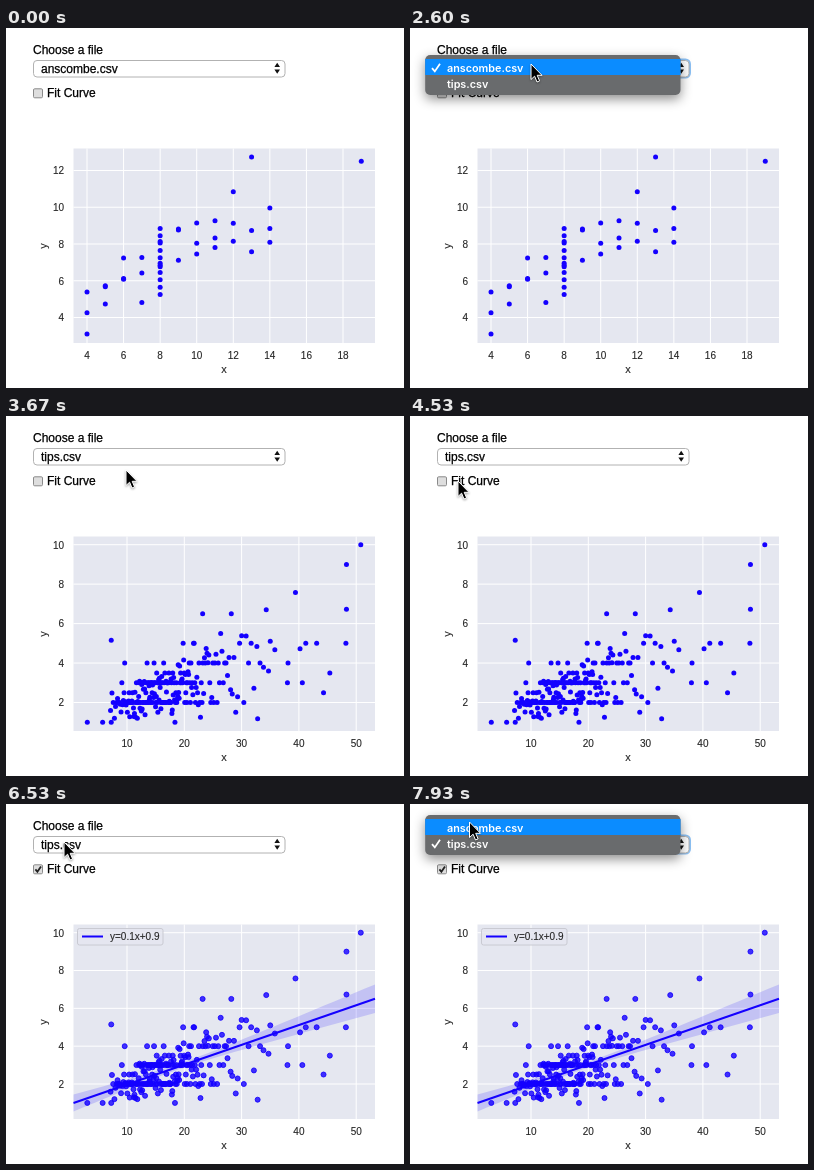
Recreate the animation shown at these times as an HTML page. Size 398x360 px, loop 8 s.

```html
<!DOCTYPE html>
<html lang="en">
<head>
<meta charset="utf-8">
<title>File chooser with scatter plot</title>
<style>
  html, body { margin: 0; width: 100%; height: 100%; overflow: hidden; background: #fff; }
  svg { display: block; }
  text { font-family: "Liberation Sans", Arial, sans-serif; font-size: 12px; stroke: #000; stroke-width: .25px; }
  .plot text { font-size: 10px; fill: #262626; stroke: #262626; stroke-width: .12px; }
  .plot .axis { font-size: 11px; }
  .menu text { font-family: Inter, Roboto, sans-serif; font-size: 10.8px; font-weight: 600; fill: #fff; stroke: none; }
  .menu .panel { filter: drop-shadow(0 4px 6px rgba(0, 0, 0, .45)); }
  .cursor { filter: drop-shadow(0 1px 1px rgba(0, 0, 0, .35)); }
</style>
</head>
<body>
<svg id="stage" width="398" height="360" viewBox="0 0 398 360"></svg>
<script>
const LOOP = 8000;
const STEP = 1000 / 15;
const BLUE = '#1400ff';
const stage = document.getElementById('stage');

function el(parent, tag, attrs = {}, text) {
  const node = document.createElementNS('http://www.w3.org/2000/svg', tag);
  for (const key in attrs) node.setAttribute(key, attrs[key]);
  if (text !== undefined) node.textContent = text;
  parent.appendChild(node);
  return node;
}

function show(node, visible) {
  node.style.display = visible ? '' : 'none';
}

function seeded(seed) {
  return () => (seed = (seed * 16807) % 2147483647) / 2147483647;
}

function range(from, to, step = 1) {
  const out = [];
  for (let v = from; v <= to; v += step) out.push(v);
  return out;
}

function linear(v0, p0, v1, p1) {
  return v => p0 + (v - v0) * (p1 - p0) / (v1 - v0);
}

// ---- data ----
// Four sets: a scattered line, a parabola, a line with an outlier, a column with an outlier.
function quartetPoints() {
  const scattered = [4.26, 5.68, 7.24, 4.82, 6.95, 8.81, 8.04, 8.33, 10.84, 7.58, 9.96];
  const sets = range(4, 14).flatMap((x, i) => [
    [x, scattered[i]],
    [x, -5.996 + 2.7808 * x - .12672 * x * x],
    [x, x === 13 ? 12.74 : 4 + .346 * x]
  ]);
  return [...sets, ...range(0, 9).map(i => [8, 5.25 + .4 * i]), [19, 12.5]];
}

// A noisy trend over log-logistic x values, often rounded to whole numbers, plus lone points.
function tipPoints() {
  const lone = [
    [3.07, 1], [5.75, 1], [7.25, 1], [7.25, 5.15], [9.6, 4], [23.2, 6.5], [28.2, 6.5],
    [34.3, 6.7], [32.8, 1.17], [34.7, 3.6], [35, 5.1], [35.8, 4.67], [38, 3], [38.1, 4],
    [39.4, 7.58], [40.2, 4.73], [40.6, 3], [41.2, 5], [43.1, 5], [44.3, 2.5], [45.4, 3.5],
    [48.2, 5], [48.3, 6.73], [48.3, 9], [50.8, 10]
  ];
  const rand = seeded(41);
  const cloud = range(0, 218).map(i => {
    const p = .03 + .91 * i / 218;
    const x = 17 * Math.pow(p / (1 - p), .25);
    const noise = rand() + rand() + rand() - 1.5;
    const y = Math.max(1.2, .92 + .105 * x + .085 * x * noise);
    const kind = rand();
    return [x, kind < .42 ? Math.max(2, Math.round(y)) : kind < .58 ? Math.round(y * 2) / 2 : y];
  });
  return [...lone, ...cloud];
}

// ---- plots ----
const AREA = { x: 67.5, y: 120.5, w: 301.5, h: 194.5 };

function makePlot({ points, px, py, xTicks, yTicks, dot, fit }) {
  const g = el(stage, 'g', { class: 'plot' });
  const right = AREA.x + AREA.w, bottom = AREA.y + AREA.h;
  el(g, 'rect', { x: AREA.x, y: AREA.y, width: AREA.w, height: AREA.h, fill: '#e5e7f0' });
  let grid = '';
  for (const v of xTicks) {
    grid += `M${px(v)} ${AREA.y}V${bottom}`;
    el(g, 'text', { x: px(v), y: 331.2, 'text-anchor': 'middle' }, v);
  }
  for (const v of yTicks) {
    grid += `M${AREA.x} ${py(v)}H${right}`;
    el(g, 'text', { x: 58, y: py(v) + 3.8, 'text-anchor': 'end' }, v);
  }
  el(g, 'path', { d: grid, stroke: '#fff', 'stroke-width': 1 });
  el(g, 'text', { class: 'axis', x: 218, y: 344.6, 'text-anchor': 'middle' }, 'x');
  el(g, 'text', { class: 'axis', transform: 'translate(41 218) rotate(-90)', 'text-anchor': 'middle' }, 'y');
  const dots = el(g, 'g', { fill: BLUE, ...dot });
  for (const [x, y] of points) el(dots, 'circle', { cx: px(x), cy: py(y), r: 2.5 });
  if (fit) drawFit(g, right);
  return g;
}

function drawFit(g, right) {
  const lineY = linear(AREA.x, 299, right, 194.7);
  const half = x => Math.hypot(2.8, (x - 177) * .073);
  const xs = range(0, 30).map(i => AREA.x + AREA.w * i / 30);
  const upper = xs.map(x => `${x},${lineY(x) - half(x)}`);
  const lower = xs.map(x => `${x},${lineY(x) + half(x)}`).reverse();
  el(g, 'polygon', { points: [...upper, ...lower].join(' '), fill: BLUE, 'fill-opacity': .16 });
  el(g, 'path', { d: `M${AREA.x} 299L${right} 194.7`, stroke: BLUE, 'stroke-width': 2 });
  el(g, 'rect', {
    x: 71.5, y: 124.5, width: 85.5, height: 16.5, rx: 2,
    fill: '#e5e7f0', 'fill-opacity': .8, stroke: '#c9cad2'
  });
  el(g, 'path', { d: 'M76 132.5H97', stroke: BLUE, 'stroke-width': 2 });
  el(g, 'text', { x: 104, y: 136 }, 'y=0.1x+0.9');
}

const tipAxes = {
  points: tipPoints(), px: linear(10, 121, 50, 350.2),
  xTicks: range(10, 50, 10), yTicks: range(2, 10, 2)
};
const quartetPlot = makePlot({
  points: quartetPoints(), px: linear(4, 81, 18, 337), py: linear(4, 289.5, 12, 142.5),
  xTicks: range(4, 18, 2), yTicks: range(4, 12, 2)
});
const tipPlot = makePlot({ ...tipAxes, py: linear(2, 286.5, 10, 128.7) });
const fitPlot = makePlot({
  ...tipAxes, py: linear(2, 280, 10, 128.7), fit: true,
  dot: { 'fill-opacity': .8, stroke: BLUE, 'stroke-opacity': .85 }
});

// ---- form ----
const FILES = ['anscombe.csv', 'tips.csv'];
el(stage, 'text', { x: 27, y: 26.3 }, 'Choose a file');
const ring = el(stage, 'rect', {
  x: 26.5, y: 31.5, width: 253.5, height: 18, rx: 4.5,
  fill: 'none', stroke: '#8cc0f3', 'stroke-width': 2
});
el(stage, 'rect', { x: 27.5, y: 32.5, width: 251.5, height: 16.5, rx: 3.5, fill: '#fff', stroke: '#b2b2b2' });
el(stage, 'path', { d: 'M268.4 39L271.2 34.8L274 39ZM268.4 41.6L271.2 45.8L274 41.6Z', fill: '#111' });
const chosen = el(stage, 'text', { x: 35, y: 44.6 });

const box = el(stage, 'rect', { x: 27.5, y: 60.8, width: 9, height: 9, rx: 1.2, stroke: '#8a8a8a' });
const tick = el(stage, 'path', {
  d: 'M29.4 65.4L31.4 67.8L35 62.4', fill: 'none', stroke: '#222', 'stroke-width': 1.8
});
el(stage, 'text', { x: 41, y: 69.2 }, 'Fit Curve');

// ---- menu ----
const ROW = 16, PAD = 4;
const menu = el(stage, 'g', { class: 'menu' });
el(menu, 'rect', { class: 'panel', x: 15.2, y: 0, width: 255.3, height: 40, rx: 5, fill: '#696b6d' });
const hover = el(menu, 'rect', { x: 15.2, width: 255.3, height: ROW, fill: '#0b8cff' });
FILES.forEach((name, i) => el(menu, 'text', { x: 37, y: 17 + i * ROW }, name));
const mark = el(menu, 'path', {
  d: 'M22 13.2L24.8 16.4L30 8.8', fill: 'none', stroke: '#fff', 'stroke-width': 1.8
});

const cursor = el(stage, 'path', {
  class: 'cursor', d: 'M0 0V15.5L3.6 12.2L6 18L8.6 16.9L6.2 11.3H11Z',
  stroke: '#fff', 'stroke-width': 1, 'stroke-linejoin': 'round', fill: '#000'
});

// ---- timing ----
// Cursor moves: start, end, x, y
const START = [35, -6];
const MOVES = [
  [400, 1200, 121, 36], [2600, 2733, 120, 54], [4267, 4533, 48, 65],
  [4533, 4933, 34, 62], [6333, 6533, 58, 38], [7067, 7267, 59.5, 18]
];
const BLINK = 60;

const within = (t, from, length) => t >= from && t < from + length;

function cursorAt(t) {
  return MOVES.reduce(([x, y], [from, to, nx, ny]) => {
    const p = Math.min(1, Math.max(0, (t - from) / (to - from)));
    const e = p * p * (3 - 2 * p);
    return [x + (nx - x) * e, y + (ny - y) * e];
  }, START);
}

function menuAlpha(t) {
  if (t >= 6790) return 1;
  if (t < 1730) return 0;
  return Math.min(1, Math.max(0, 1 - (t - 3130) / 270));
}

function draw(time) {
  // The picture advances 15 steps a second.
  const t = Math.floor((time % LOOP + 8) / STEP) * STEP;
  const file = t >= 3660 ? 1 : 0;
  const fitted = t >= 5660;
  show(quartetPlot, !file);
  show(tipPlot, file && !fitted);
  show(fitPlot, fitted);
  chosen.textContent = FILES[file];

  box.setAttribute('fill', within(t, 5060, BLINK) ? '#aaa' : '#dedede');
  show(tick, t >= 5125);

  const [x, y] = cursorAt(t);
  cursor.setAttribute('transform', `translate(${x} ${y})`);
  show(cursor, t >= 130);

  const alpha = menuAlpha(t);
  const top = file ? 11 : 27;
  const row = Math.floor((y - top - PAD) / ROW);
  menu.setAttribute('opacity', alpha);
  ring.setAttribute('opacity', alpha);
  show(menu, alpha > 0);
  menu.setAttribute('transform', `translate(0 ${top})`);
  hover.setAttribute('y', PAD + row * ROW);
  show(hover, !within(t, 3060, BLINK) && !within(t, 7860, BLINK));
  mark.setAttribute('transform', `translate(0 ${file * ROW})`);
}

const start = performance.now();
function tickFrame() {
  draw(performance.now() - start);
  requestAnimationFrame(tickFrame);
}
tickFrame();
</script>
</body>
</html>
```
